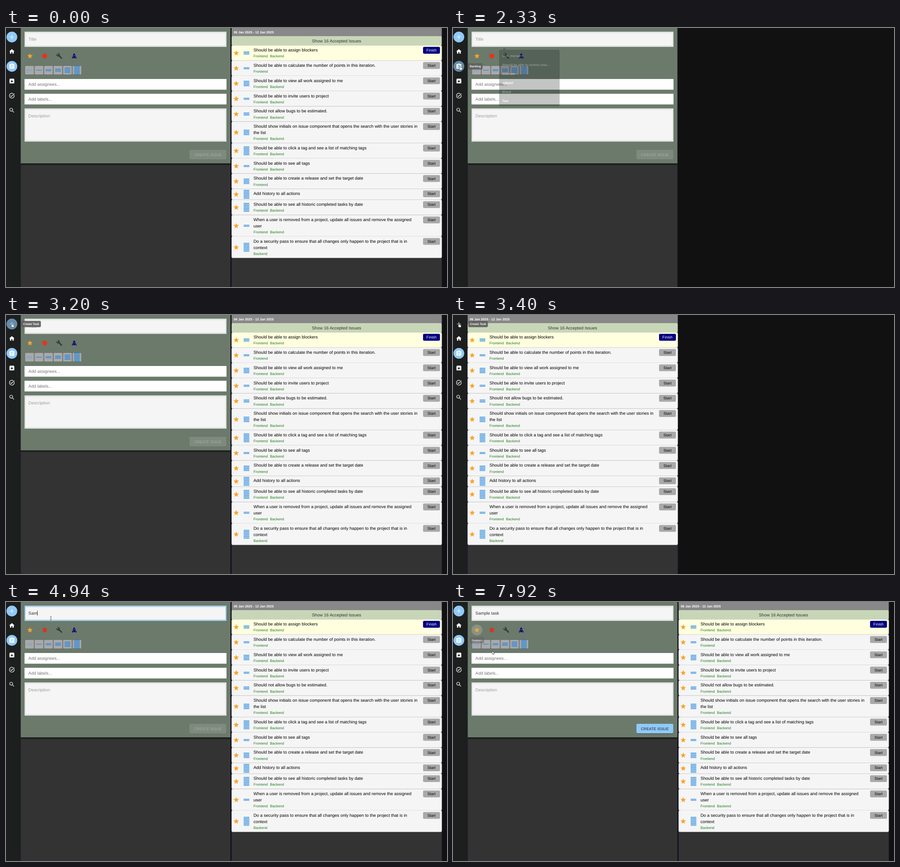
An HTML page for the animation above (7990 ms loop, 976 by 574 pixels).

```html
<!DOCTYPE html>
<html lang="en">
<head>
<meta charset="utf-8">
<title>Issue board</title>
<style>
  html, body { margin: 0; width: 100%; height: 100%; overflow: hidden; background: #111; }
  svg { display: block; width: 976px; height: 574px; }
  text { font-family: "Liberation Sans", Arial, sans-serif; text-rendering: geometricPrecision; white-space: pre; }
</style>
</head>
<body>
<svg id="stage" viewBox="0 0 976 574" xmlns="http://www.w3.org/2000/svg"></svg>
<script>
const LOOP = 7990;
const BODY = 9.52, SMALL = 7.93, BUTTON = 8.33;
const BLUE = '#90caf9';

const icons = {
  add: 'M19 13h-6v6h-2v-6H5v-2h6V5h2v6h6v2z',
  home: 'M10 20v-6h4v6h5v-8h3L12 3 2 12h3v8z',
  backlog: 'M19 3h-4.18C14.4 1.84 13.3 1 12 1c-1.3 0-2.4.84-2.82 2H5c-1.1 0-2 .9-2 2v14c0 1.1.9 2 2 2h14c1.1 0 2-.9 2-2V5c0-1.1-.9-2-2-2zm-7 0c.55 0 1 .45 1 1s-.45 1-1 1-1-.45-1-1 .45-1 1-1zm2 14H7v-2h7v2zm3-4H7v-2h10v2zm0-4H7V7h10v2z',
  archive: 'M20.54 5.23l-1.39-1.68C18.88 3.21 18.47 3 18 3H6c-.47 0-.88.21-1.16.55L3.46 5.23C3.17 5.57 3 6.02 3 6.5V19c0 1.1.9 2 2 2h14c1.1 0 2-.9 2-2V6.5c0-.48-.17-.93-.46-1.27zM12 17.5L6.5 12H10v-2h4v2h3.5L12 17.5z',
  done: 'M22 5.18L10.59 16.6l-4.24-4.24 1.41-1.41 2.83 2.83 10-10L22 5.18zm-2.21 5.04c.13.57.21 1.17.21 1.78 0 4.42-3.58 8-8 8s-8-3.58-8-8 3.58-8 8-8c1.58 0 3.04.46 4.28 1.25l1.44-1.44C16.1 2.67 14.13 2 12 2 6.48 2 2 6.48 2 12s4.48 10 10 10 10-4.48 10-10c0-1.19-.22-2.33-.6-3.39l-1.61 1.61z',
  search: 'M15.5 14h-.79l-.28-.27C15.41 12.59 16 11.11 16 9.5 16 5.91 13.09 3 9.5 3S3 5.91 3 9.5 5.91 16 9.5 16c1.61 0 3.09-.59 4.23-1.57l.27.28v.79l5 4.99L20.49 19l-4.99-5zm-6 0C7.01 14 5 11.99 5 9.5S7.01 5 9.5 5 14 7.01 14 9.5 11.99 14 9.5 14z',
  star: 'M12 17.27L18.18 21l-1.64-7.03L22 9.24l-7.19-.61L12 2 9.19 8.63 2 9.24l5.46 4.73L5.82 21z',
  bug: 'M20 8h-2.81c-.45-.78-1.07-1.45-1.82-1.96L17 4.41 15.59 3l-2.17 2.17C12.96 5.06 12.49 5 12 5c-.49 0-.96.06-1.41.17L8.41 3 7 4.41l1.62 1.63C7.88 6.55 7.26 7.22 6.81 8H4v2h2.09c-.05.33-.09.66-.09 1v1H4v2h2v1c0 .34.04.67.09 1H4v2h2.81c1.04 1.79 2.97 3 5.19 3s4.15-1.21 5.19-3H20v-2h-2.09c.05-.33.09-.66.09-1v-1h2v-2h-2v-1c0-.34-.04-.67-.09-1H20V8zm-6 8h-4v-2h4v2zm0-4h-4v-2h4v2z',
  tool: 'M22.7 19l-9.1-9.1c.9-2.3.4-5-1.5-6.9-2-2-5-2.4-7.4-1.3L9 6 6 9 1.6 4.7C.4 7.1.9 10.1 2.9 12.1c1.9 1.9 4.6 2.4 6.9 1.5l9.1 9.1c.4.4 1 .4 1.4 0l2.3-2.3c.5-.4.5-1.1.1-1.4z',
  rocket: 'M12 2.5s4.5 2.04 4.5 10.5c0 2.49-1.04 5.57-1.6 7H9.1c-.56-1.43-1.6-4.51-1.6-7C7.5 4.54 12 2.5 12 2.5zm2 8.5c0-1.1-.9-2-2-2s-2 .9-2 2 .9 2 2 2 2-.9 2-2zm-6.31 9.52c-.48-1.23-1.52-4.17-1.67-6.87l-1.13.75c-.56.38-.89 1-.89 1.67V22l3.69-1.48zM20 22v-5.93c0-.67-.33-1.29-.89-1.66l-1.13-.75c-.15 2.69-1.2 5.64-1.67 6.87L20 22z'
};

// Markup helpers
const rect = (x, y, w, h, fill, more = '') =>
  `<rect x="${x}" y="${y}" width="${w}" height="${h}" fill="${fill}" ${more}/>`;
const text = (x, y, size, fill, str, more = '') =>
  `<text x="${x}" y="${y}" font-size="${size}" fill="${fill}" ${more}>${str}</text>`;
const icon = (name, x, y, fill = '#fff') =>
  `<path d="${icons[name]}" fill="${fill}" fill-rule="evenodd" transform="translate(${x} ${y}) scale(.595) translate(-12 -12)"/>`;
const middle = 'text-anchor="middle"';
const spaced = middle + ' letter-spacing=".1"';
const bold = 'font-weight="700"';

function bars(x, cy, n, color = '#2186e0') {
  let out = '';
  for (let i = 0; i < n; i++) {
    out += rect(x - 6.3, cy + (i - (n - 1) / 2) * 2.55 - .65, 12.6, 1.3, color);
  }
  return out;
}

const inset = (x, y, w, h) =>
  rect(x, y, w, h, '#f5f5f5') +
  rect(x + 1.5, y + 1.5, w - 3, h - 3, 'none', 'stroke="#e8e8e8" stroke-width="3"') +
  rect(x + .5, y + .5, w - 1, h - 1, 'none', 'stroke="#d6d9d6"');

const tooltip = (id, x, y, w, label) =>
  `<g id="${id}">` + rect(x, y, w, 14, '#616161', 'rx="2.4"') +
  text(x + w / 2, y + 9.2, 6.35, '#fff', label, middle + bold) + '</g>';

const navButton = (id, y, name) =>
  `<g id="${id}On"><circle cx="13" cy="${y}" r="11.9" fill="${BLUE}"/>` +
  `<circle id="${id}Hover" cx="13" cy="${y}" r="11.9" fill="#000"/></g>` + icon(name, 13, y);

function sidebar() {
  return rect(0, 0, 32, 574, '#1c1f1e') +
    navButton('plus', 20, 'add') + icon('home', 13, 52) + navButton('back', 85, 'backlog') +
    icon('archive', 13, 117.5) + icon('done', 13, 150) + icon('search', 13, 182.5);
}

function form() {
  let s = rect(32, 0, 465.5, 574, '#12122f') + rect(32.6, 0, 464, 574, '#333') +
    rect(32.6, 300, 464, 5, 'url(#shade)') + rect(32.6, 0, 464, 300, '#6b7a6b') +
    inset(41, 8.5, 447, 33) +
    rect(42, 9.5, 445, 31, 'none', `id="focus" stroke="${BLUE}" stroke-width="2"`) +
    text(49.6, 28, BODY, '#9c9c9c', '', 'id="title"') +
    rect(0, 19, .8, 11, '#111', 'id="caret"') +
    '<circle id="ring" cx="53" cy="62" r="12" fill="#d8d8d0" fill-opacity=".3"/>' +
    icon('star', 53, 62, '#faa32c') + icon('bug', 85.7, 62, '#f0260c') +
    '<ellipse id="blob" cx="85.7" cy="62.2" rx="4.9" ry="5.4" fill="#f03016"/>' +
    icon('tool', 118, 62, '#3a3a3a') + icon('rocket', 151, 62, '#000080');
  [2, 1, 2, 3, 5, 8].forEach((n, i) => {
    const x = 41.5 + i * 21;
    s += rect(x + .4, 83.4, 20.2, 20.2, '#a9a9a9', 'rx="2" stroke="#666" stroke-width=".8"') +
      bars(x + 10.5, 93.5, n, i ? undefined : '#7ba6cf');
  });
  s += rect(41, 113, 447, 23.7, '#fff') + text(49.6, 128.3, BODY, '#757575', 'Add assignees...') +
    rect(41, 145.7, 447, 23.7, '#fff') + text(49.6, 160.8, BODY, '#757575', 'Add labels...') +
    inset(41, 178.5, 447, 73) + text(49.6, 198.2, BODY, '#9c9c9c', 'Description') +
    rect(406, 270, 81.5, 21, '#fff', 'rx="2.4" fill-opacity=".12"') +
    text(446.8, 283.5, BUTTON, '#fff', 'CREATE ISSUE', spaced + ' fill-opacity=".33"') +
    '<g id="create">' + rect(406, 271.2, 81.5, 21, '#000', 'rx="2.4" opacity=".3"') +
    rect(406, 270, 81.5, 21, BLUE, 'rx="2.4"') +
    text(446.8, 283.5, BUTTON, '#1c2226', 'CREATE ISSUE', spaced) + '</g>';
  return `<g id="form">${s}</g>`;
}

// [lines of the heading, estimate, labels: F and/or B]
const issues = [
  [['Should be able to assign blockers'], 3, 'FB'],
  [['Should be able to calculate the number of points in this iteration.'], 2, 'F'],
  [['Should be able to view all work assigned to me'], 5, 'FB'],
  [['Should be able to invite users to project'], 2, 'FB'],
  [['Should not allow bugs to be estimated.'], 3, 'FB'],
  [['Should show initials on issue component that opens the search with the user stories in', 'the list'], 5, 'FB'],
  [['Should be able to click a tag and see a list of matching tags'], 8, 'FB'],
  [['Should be able to see all tags'], 2, 'FB'],
  [['Should be able to create a release and set the target date'], 5, 'F'],
  [['Add history to all actions'], 8, ''],
  [['Should be able to see all historic completed tasks by date'], 8, 'FB'],
  [['When a user is removed from a project, update all issues and remove the assigned', 'user'], 2, 'FB'],
  [['Do a security pass to ensure that all changes only happen to the project that is in', 'context'], 8, 'B']
];

function list() {
  let s = rect(498.6, 0, 467, 574, '#12122f') + rect(499.4, 0, 465, 574, '#333') +
    rect(499.4, 0, 465, 18, '#888') +
    text(504, 11.7, 7.3, '#fff', '06 Jan 2025 - 12 Jan 2025', bold) +
    rect(499.4, 18, 465, 20.5, '#c8d6b8', 'rx="2"') +
    text(731.5, 31.6, BODY, '#333', 'Show 16 Accepted Issues', middle);
  let y = 38.5;
  issues.forEach(([lines, points, labels], i) => {
    const extra = (lines.length - 1) * 13.9;
    const h = (labels ? 33.8 : 24) + extra, cy = y + h / 2;
    s += rect(499.4, y, 465, h, '#ccc', 'rx="2.4"') +
      rect(499.4, y, 465, h - .7, i ? '#f5f5f5' : '#ffffe0', 'rx="2.4"') +
      icon('star', 509.5, cy, '#faa32c') + bars(532.2, cy, points);
    lines.forEach((line, n) => s += text(547.7, y + 13.6 + n * 13.9, BODY, '#000', line));
    let x = 547.7;
    for (const l of labels) {
      s += text(x, y + 26.8 + extra, SMALL, '#1b7a1b', l === 'F' ? 'Frontend' : 'Backend');
      x += 36.6;
    }
    s += rect(923, y + 3.3, 37.4, 15.2, i ? '#a9a9a9' : '#000080', 'rx="2.4"') +
      text(941.7, y + 13.7, BUTTON, i ? '#000' : '#fff', i ? 'Start' : 'Finish', spaced);
    y += h;
  });
  return `<g id="list">${s}</g>`;
}

function popup() {
  const past = ['task_manager', 'Should be able to receive crea...', 'wumbek', 'adfadsf', 'Blood', 'Test'];
  return '<g id="popup"><path d="M106 46l5-5 5 5z" fill="#161c1e"/>' +
    rect(99, 45.5, 140, 130.6, '#161c1e', 'rx="3"') +
    past.map((p, i) => text(106.4, 61.6 + i * 20.9, 7.14, '#fff', p, bold)).join('') + '</g>';
}

const pointers = `<g id="pointer" stroke-linejoin="round">
  <path id="arrow" d="M0 0v7.2l1.7-1.5 1.2 2.4 1.2-.6-1.2-2.3h2.2z" fill="#fff" stroke="#222" stroke-width=".6"/>
  <path id="hand" d="M-.8.4q.8-.9 1.6 0v3l3.2.7q1.2.3 1 1.6l-.6 3.3h-4.2l-2.4-3q0-1.2 1.4-.4z" fill="#fff" stroke="#222" stroke-width=".6"/>
  <path id="beam" d="M-1.7-3.5h1.2l.5.5.5-.5h1.2M0-3v6M-1.7 3.5h1.2l.5-.5.5.5h1.2" fill="none" stroke="#333" stroke-width=".8"/>
</g>`;

stage.innerHTML = `<defs><linearGradient id="shade" x2="0" y2="1">
  <stop stop-color="#111"/><stop offset="1" stop-color="#333"/></linearGradient></defs>` +
  rect(0, 0, 976, 574, '#111') + sidebar() + list() + form() +
  tooltip('tipPlus', 33.7, 12.9, 43.5, 'Create Task') + tooltip('tipBack', 33, 78, 32.5, 'Backlog') +
  tooltip('tipStar', 37, 77.5, 32, 'Feature') + popup() + pointers;

const el = id => document.getElementById(id);
const within = (t, a, b) => t >= a && t < b;
const show = (id, yes) => el(id).style.display = yes ? '' : 'none';
const fade = (id, v) => el(id).setAttribute('opacity', v);

// Piecewise value over time from [time, value] pairs
function track(t, keys, ease = u => u) {
  if (t <= keys[0][0]) return keys[0][1];
  for (let i = 1; i < keys.length; i++) {
    const [a, v] = keys[i - 1], [b, w] = keys[i];
    if (t < b) return v + (w - v) * ease((t - a) / (b - a));
  }
  return keys[keys.length - 1][1];
}
const pulse = (a, b, c, d, top = 1) => [[a, 0], [b, top], [c, top], [d, 0]];
const smooth = u => u * u * (3 - 2 * u);

const path = [
  [70, 838, 552], [840, 112, 62], [1050, 100, 34], [1500, 100, 34], [1800, 13.5, 23.5], [1930, 13.5, 23.5],
  [2140, 15.5, 84], [2850, 15.5, 84], [3060, 13, 18], [3830, 13.2, 18.4], [4150, 99.3, 36],
  [7070, 99.3, 36], [7330, 53, 63], [7660, 53, 63], [7920, 86.7, 108.7], [7990, 89, 111]
];
const pathX = path.map(p => [p[0], p[1]]), pathY = path.map(p => [p[0], p[2]]);

const typed = 'Sample task';
const strokes = [4670, 4740, 4940, 5010, 5270, 5470, 5540, 5930, 6130, 6200, 6320];

const fades = {
  plusOn: [[3270, 1], [3400, 0], [3690, 0], [3900, 1]],
  backOn: [[2330, 1], [2450, 0], [2730, 0], [2930, 1]],
  plusHover: [...pulse(1740, 1850, 1960, 2080, .31), ...pulse(2980, 3100, 3880, 4000, .31)],
  backHover: pulse(2060, 2160, 2870, 2980, .31),
  tipPlus: [...pulse(1850, 1990, 2020, 2130, .92), ...pulse(3060, 3190, 3920, 4060, .92)],
  tipBack: pulse(2180, 2320, 2880, 3020, .92),
  tipStar: pulse(7330, 7480, 7830, 8040, .92),
  ring: pulse(7280, 7400, 7900, 8100),
  create: [[7620, 0], [7870, 1]],
  popup: pulse(1320, 1460, 2230, 2365)
};
const popupSize = [[1320, .95], [1460, 1], [2230, 1], [2365, .942]];

function drawTitle(t) {
  const count = strokes.filter(s => t >= s).length;
  const title = el('title');
  title.textContent = count ? typed.slice(0, count) : 'Title';
  title.setAttribute('fill', count ? '#333' : '#9c9c9c');
  const focused = within(t, 930, 2260) || within(t, 4200, 7600);
  const last = count ? strokes[count - 1] : t < 4200 ? 930 : 4200;
  show('focus', focused);
  show('caret', focused && Math.floor((t - last) / 530) % 2 === 0);
  el('caret').setAttribute('x', 49.6 + (count ? title.getSubStringLength(0, count) : 0));
}

function drawPointer(t) {
  const x = track(t, pathX, smooth), y = track(t, pathY, smooth);
  const hand = x < 26 || Math.hypot(x - 53, y - 62) < 12;
  const field = x > 41 && x < 488 &&
    (within(y, 8, 42) || within(y, 113, 137) || within(y, 146, 169) || within(y, 179, 251));
  show('pointer', t >= 70);
  show('hand', hand);
  show('beam', !hand && field);
  show('arrow', !hand && !field);
  el('pointer').setAttribute('transform', `translate(${x} ${y})`);
}

function draw(t) {
  for (const id in fades) fade(id, track(t, fades[id]));
  const k = track(t, popupSize);
  el('popup').setAttribute('transform', `translate(169 111) scale(${k}) translate(-169 -111)`);
  const closed = within(t, 3270, 3640);
  show('form', !closed);
  show('blob', t < 3640);
  show('list', !within(t, 2300, 2700));
  el('list').setAttribute('transform', closed ? 'translate(-467 0)' : '');
  if (!closed) drawTitle(t);
  drawPointer(t);
}

const start = performance.now();
function tick() {
  draw((performance.now() - start) % LOOP);
  requestAnimationFrame(tick);
}
tick();
</script>
</body>
</html>
```
